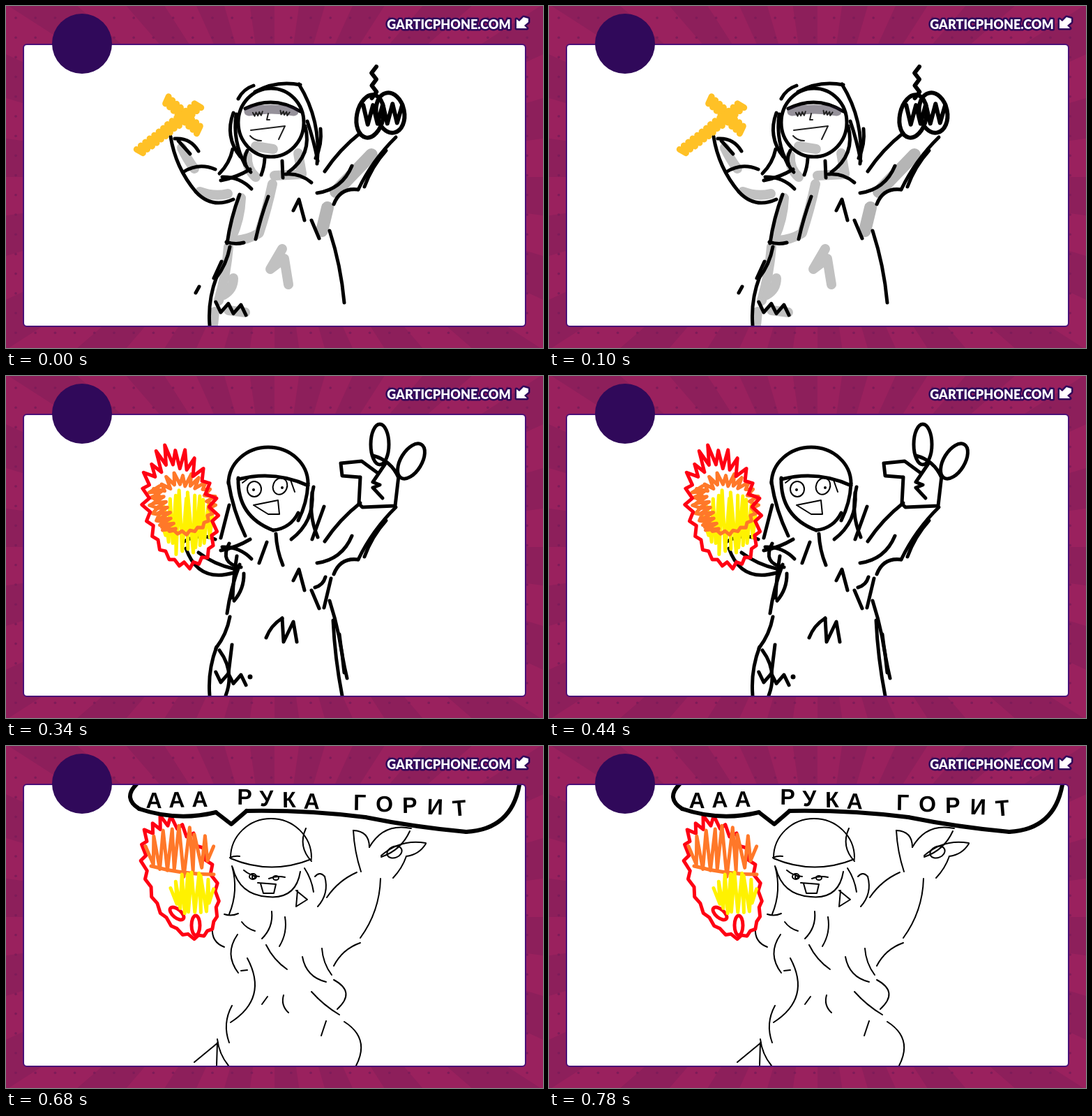
Animation, 770 px wide and 490 px high, one loop 0.85 s. Source, as an HTML page with a canvas:

```html
<!DOCTYPE html>
<html lang="en">
<head>
<meta charset="utf-8">
<title>Hand-drawn loop</title>
<style>
html, body { margin: 0; width: 100%; height: 100%; overflow: hidden; background: #98215d; }
canvas { display: block; }
</style>
</head>
<body>
<canvas id="stage" width="770" height="490"></canvas>
<script>
const ctx = document.getElementById('stage').getContext('2d');
const STEP = 170, TAU = 2 * Math.PI;
const RED = '#ff0013', ORANGE = '#ff7829', YELLOW = '#fff200', GOLD = '#ffc126';

const random = seed => { const v = Math.sin(seed * 12.9898) * 43758.5453; return v - Math.floor(v); };

function pen(color, width) {
  ctx.strokeStyle = ctx.fillStyle = color;
  ctx.lineWidth = width;
  ctx.lineCap = ctx.lineJoin = 'round';
}

// Stroke between two points, bulging by sag (right-going strokes sag downwards).
function bow(x1, y1, x2, y2, sag = 0) {
  const k = 2 * sag / Math.hypot(x2 - x1, y2 - y1);
  ctx.beginPath();
  ctx.moveTo(x1, y1);
  ctx.quadraticCurveTo((x1 + x2) / 2 + (y1 - y2) * k, (y1 + y2) / 2 + (x2 - x1) * k, x2, y2);
  ctx.stroke();
}

function polyline(...p) {
  ctx.beginPath();
  for (let i = 0; i < p.length; i += 2) ctx.lineTo(p[i], p[i + 1]);
  ctx.stroke();
}

function oval(x, y, rx, ry = rx, tilt = 0, from = 0, to = TAU) {
  ctx.beginPath();
  ctx.ellipse(x, y, rx, ry, tilt, from, to);
  ctx.stroke();
}

// Zigzag along a line, swinging by reach to either side.
function scribble(x1, y1, x2, y2, turns, reach) {
  const len = Math.hypot(x2 - x1, y2 - y1);
  ctx.beginPath();
  for (let i = 0; i <= turns; i++) {
    const k = i / turns, r = (i % 2 ? 1 : -1) * reach * (0.75 + 0.25 * random(i)) / len;
    ctx.lineTo(x1 + (x2 - x1) * k + (y1 - y2) * r, y1 + (y2 - y1) * k + (x2 - x1) * r);
  }
  ctx.stroke();
}

// Up and down strokes that fill an oval from left to right.
function hatch(color, x, y, rx, ry, turns) {
  pen(color, 5);
  ctx.beginPath();
  for (let i = 0; i <= turns; i++) {
    const u = 2 * i / turns - 1;
    const h = ry * Math.sqrt(1.05 - u * u) * (0.7 + 0.3 * random(i + x));
    ctx.lineTo(x + rx * u + 6 * random(i), y + (i % 2 ? h : -h));
  }
  ctx.stroke();
}

// Closed oval with teeth that are deepest at its top.
function flame(color, x, y, rx, ry, tilt, depth, turns) {
  pen(color, 5);
  ctx.save();
  ctx.translate(x, y);
  ctx.rotate(tilt);
  ctx.beginPath();
  for (let i = 0; i < turns; i++) {
    const a = i / turns * TAU, top = (1 - Math.sin(a)) / 2;
    const k = 1 - depth * (0.25 + 0.75 * top) * (i % 2 ? 0.6 + 0.4 * random(i) : 0.3 * random(i));
    ctx.lineTo(rx * k * Math.cos(a), ry * k * Math.sin(a));
  }
  ctx.closePath();
  ctx.stroke();
  ctx.restore();
}

// Letters set one by one with a slightly unsteady hand.
function scrawl(text, x, y, dx, dy, font) {
  ctx.font = font;
  ctx.textAlign = 'center';
  [...text].forEach((letter, i) => {
    ctx.save();
    ctx.translate(x + i * dx, y + i * dy);
    ctx.rotate(0.25 * (random(i + 3) - 0.5));
    ctx.fillText(letter, 0, 0);
    ctx.restore();
  });
}

function backdrop() {
  ctx.fillStyle = '#9a215e';
  ctx.fillRect(0, 0, 770, 490);
  ctx.fillStyle = '#8d1f5b';
  const rays = 22;
  for (let i = 0; i < rays; i++) {
    ctx.beginPath();
    ctx.moveTo(385, 245);
    ctx.arc(385, 245, 600, i / rays * TAU, (i + 0.5) / rays * TAU);
    ctx.fill();
  }
  ctx.fillStyle = '#7d1c59';
  for (let y = 17; y < 490; y += 28.2)
    for (let x = 14; x < 770; x += 28.2) {
      ctx.beginPath();
      ctx.arc(x, y, 1.8, 0, TAU);
      ctx.fill();
    }
  ctx.beginPath();
  ctx.roundRect(25, 55, 720, 404, 5);
  pen('#4a1077', 2);
  ctx.fillStyle = '#fff';
  ctx.fill();
  ctx.stroke();
}

function header() {
  pen('#30095a', 5);
  ctx.beginPath();
  ctx.arc(109, 54, 43, 0, TAU);
  ctx.fill();
  ctx.font = '900 18px Lato, sans-serif';
  ctx.textAlign = 'center';
  ctx.strokeText('GARTICPHONE.COM', 635, 33);
  const arrow = new Path2D('M732 19 L736 22 L742 16 L749 18 L749 23 L743 28 L747 32 L732 32 Z');
  ctx.stroke(arrow);
  ctx.fillStyle = '#fff';
  ctx.fillText('GARTICPHONE.COM', 635, 33);
  ctx.fill(arrow);
}

// Robe and arms of the three bold drawings.
function robe() {
  bow(335, 270, 317, 340, 2);
  bow(321, 345, 301, 390, -3);
  bow(302, 388, 292, 458, 4);
  bow(464, 322, 485, 425, -3);
  bow(254, 238, 300, 234, -6);
  bow(310, 245, 352, 262, -5);
  bow(350, 234, 308, 250, -2);
  bow(508, 182, 457, 237, 3);
  bow(446, 268, 496, 229, 9);
  bow(559, 188, 505, 263, 4);
  bow(505, 263, 470, 284, 8);
  bow(545, 207, 514, 259, 3);
  polyline(412, 293, 420, 277, 428, 307);
  bow(438, 307, 449, 333);
  scribble(300, 430, 345, 436, 5, 8);
}

function leftForearm() {
  bow(236, 187, 272, 266, 6);
  bow(272, 266, 326, 277, 10);
  bow(242, 190, 276, 208, -6);
  bow(247, 193, 264, 212);
  bow(376, 273, 358, 334, 1);
  bow(316, 338, 341, 339, 2);
}

function hoodSides(width) {
  pen('#000', width);
  bow(355, 114, 333, 133, 3);
  bow(330, 155, 343, 228, 6);
  bow(432, 165, 447, 222, -1);
  bow(429, 172, 405, 238, -12);
}

function shadedPose() {
  pen('#c1c1c1', 14);
  bow(252, 203, 270, 233, 1);
  bow(278, 266, 318, 269, 3);
  bow(337, 275, 323, 333, -3);
  bow(382, 255, 363, 325, -1);
  bow(362, 326, 329, 336, -2);
  bow(346, 215, 358, 245, 4);
  bow(419, 211, 424, 240);
  bow(424, 241, 385, 243);
  bow(319, 345, 305, 422, -2);
  bow(326, 390, 312, 414, -4);
  bow(299, 438, 297, 458);
  bow(319, 436, 343, 439);
  polyline(396, 348, 379, 377, 399, 362, 405, 399);
  bow(358, 201, 383, 205);
  pen('#b5b5b5', 18);
  bow(524, 213, 473, 266);
  bow(461, 289, 453, 322);

  pen('#000', 5);
  oval(380, 167, 47, 49);
  bow(343, 147, 422, 151, -11);
  bow(357, 123, 422, 113, -6);
  bow(420, 112, 446, 226, -10);
  bow(451, 176, 444, 218, -3);
  bow(326, 153, 336, 216, 9);
  bow(325, 205, 306, 240, -3);
  bow(346, 207, 351, 238, 6);
  bow(371, 218, 366, 242, -1);
  bow(396, 222, 397, 246);
  bow(401, 241, 438, 253, -4);
  bow(309, 366, 298, 390);
  bow(277, 402, 272, 411);
  hoodSides(5);
  robe();
  leftForearm();

  pen('#000', 6);
  scribble(528, 87, 528, 132, 5, 4);
  oval(522, 158, 19, 31, 0.2);
  oval(551, 153, 20, 29, -0.2);
  scribble(512, 154, 568, 155, 8, 16);

  pen('rgba(35,25,45,.48)', 13);
  bow(348, 151, 413, 151, -3);
  pen('#222', 2);
  scribble(354, 155, 368, 154, 6, 3);
  scribble(393, 152, 406, 155, 6, 3);
  polyline(376, 154, 374, 163, 378, 163);
  polyline(351, 178, 400, 172, 391, 191);
  bow(350, 186, 366, 193, 2);

  pen(GOLD, 9);
  scribble(230, 133, 277, 179, 17, 6);
  scribble(277, 142, 190, 209, 27, 6);
}

function torchPose() {
  pen('#666', 6);
  bow(405, 106, 447, 221, -13);
  bow(327, 196, 304, 247, -4);
  bow(275, 200, 286, 222);
  bow(455, 187, 453, 222);
  bow(453, 222, 436, 234);
  bow(371, 227, 370, 263);
  bow(391, 226, 398, 257);
  bow(345, 279, 327, 338);
  bow(543, 227, 514, 260);
  bow(277, 402, 272, 408);
  bow(369, 380, 398, 343, 5);
  scribble(392, 364, 410, 378, 5, 15);
  scribble(321, 382, 308, 428, 6, 6);
  scribble(464, 288, 453, 318, 7, 6);
  ctx.beginPath();
  ctx.ellipse(380, 149, 43, 11, 0, 0, TAU);
  ctx.fill();

  hoodSides(5);
  oval(381, 176, 47, 40);
  oval(376, 158, 47, 45, 0, Math.PI, TAU - 0.45);
  robe();
  leftForearm();
  bow(310, 245, 320, 269, 10);
  bow(267, 244, 311, 266, 5);

  oval(537, 157, 32, 33);
  bow(514, 132, 526, 184, -16);
  bow(554, 130, 548, 180, 5);
  pen('#000', 6);
  oval(535, 98, 10, 29, 0.1);
  oval(492, 135, 15, 10, 0.1);
  oval(590, 120, 13, 27, 0.45);
  bow(578, 121, 603, 97, -3);

  pen('#000', 2);
  scribble(355, 151, 368, 153, 3, 3);
  scribble(383, 150, 399, 150, 3, 3);
  bow(373, 157, 381, 158, 7);
  polyline(350, 176, 398, 173, 389, 196);
  bow(354, 187, 362, 197);

  pen(GOLD, 9);
  scribble(230, 149, 222, 256, 27, 8);
  scribble(177, 176, 287, 179, 27, 10);

  flame(RED, 183, 152, 20, 36, 0, 0.5, 12);
  pen(ORANGE, 5);
  scribble(191, 130, 190, 173, 6, 8);
  pen(YELLOW, 5);
  scribble(181, 126, 181, 172, 6, 8);
}

function blazePose() {
  pen('#000', 5);
  oval(376, 154, 57, 52, 0, Math.PI, TAU);
  bow(319, 152, 343, 229, 3);
  bow(433, 154, 419, 207, -3);
  bow(333, 148, 433, 157, -9);
  bow(333, 146, 383, 221, 16);
  bow(383, 221, 419, 196, 6);
  bow(320, 185, 308, 232);
  bow(441, 159, 447, 231, 6);
  bow(439, 167, 409, 234, -10);
  bow(456, 187, 439, 234);
  bow(320, 240, 337, 274, 13);
  bow(374, 238, 363, 268);
  bow(387, 226, 397, 271, 2);
  bow(276, 253, 326, 276, 3);
  bow(258, 247, 326, 282, 18);
  bow(331, 258, 325, 318, 1);
  bow(341, 283, 327, 322, -4);
  bow(324, 385, 319, 426);
  bow(306, 393, 315, 458, -9);
  bow(443, 303, 458, 288, 3);
  bow(466, 290, 456, 332);
  bow(373, 375, 396, 347, -3);
  polyline(396, 347, 398, 381, 412, 352, 417, 381);
  bow(469, 350, 482, 458, 2);
  bow(478, 370, 489, 433, 1);
  robe();
  oval(350, 431, 1);

  polyline(508, 145, 506, 183, 511, 188, 558, 186, 563, 143);
  oval(536, 98, 13, 29);
  oval(581, 122, 15, 28, 0.55);
  polyline(507, 145, 482, 143, 480, 125, 510, 122, 533, 139);
  bow(526, 114, 563, 146, -6);
  polyline(545, 124, 526, 152, 536, 156, 526, 160, 540, 175);

  pen('#000', 2);
  oval(356, 162, 10, 11);
  oval(393, 158, 10, 12, 0.4);
  oval(355, 163, 1);
  oval(396, 160, 1);
  bow(408, 149, 414, 166);
  bow(339, 153, 347, 147);
  polyline(355, 185, 390, 178, 392, 198, 376, 198, 355, 185);

  hatch(YELLOW, 256, 210, 36, 48, 22);
  flame(ORANGE, 253, 182, 48, 46, -0.2, 0.5, 46);
  pen(ORANGE, 5);
  scribble(213, 160, 234, 222, 16, 10);
  flame(RED, 249, 186, 54, 92, -0.2, 0.42, 46);
}

// Head, hand and body shared by the two thin drawings.
function thinFigure() {
  pen('#000', 2);
  oval(380, 160, 58, 56, 0, Math.PI, TAU);
  bow(322, 161, 438, 162, 12);
  bow(325, 174, 375, 216, 12);
  bow(375, 216, 422, 180, 14);
  bow(324, 172, 320, 241, -6);
  bow(313, 241, 333, 240, 2);
  bow(428, 175, 441, 209, -2);
  bow(443, 187, 457, 187, -4);
  bow(457, 187, 447, 230, -6);

  bow(498, 121, 509, 180, 2);
  bow(498, 121, 521, 145, -8);
  bow(521, 145, 581, 118, -12);
  bow(579, 122, 538, 159, -6);
  bow(538, 157, 602, 139, -8);
  bow(602, 140, 574, 158, -4);
  bow(574, 158, 555, 189, -2);
  oval(557, 152, 11, 8, -0.4);
  bow(503, 181, 460, 217, 4);
  bow(537, 190, 508, 275, -7);

  bow(332, 270, 333, 325, 10);
  bow(346, 304, 322, 396, -22);
  bow(381, 237, 367, 276, -5);
  bow(373, 285, 403, 320, 3);
  bow(425, 302, 459, 338, 8);
  bow(453, 290, 467, 328, 3);
  bow(470, 335, 475, 377, -15);
  bow(438, 352, 478, 385, 2);
  bow(324, 372, 320, 425, 6);
  bow(303, 420, 319, 458, 3);
}

function note(x, y) {
  bow(x, y, x - 2, y + 34);
  bow(x, y, x + 8, y + 14, -4);
  oval(x - 5, y + 34, 4, 5, 0.6);
}

function singingPose() {
  thinFigure();
  bow(307, 87, 304, 123, 8);
  bow(338, 74, 313, 118, 9);
  bow(440, 102, 442, 130, -3);
  bow(453, 95, 453, 137, -2);
  bow(312, 205, 315, 243, -12);
  bow(330, 242, 379, 265, 9);
  bow(379, 265, 376, 231, 4);
  bow(390, 238, 394, 281, -12);
  bow(289, 262, 313, 263, 3);
  bow(287, 264, 330, 283, 14);
  bow(322, 372, 330, 441, 17);
  bow(329, 372, 324, 397);
  bow(470, 335, 470, 395, -18);
  bow(465, 380, 448, 423, -6);
  bow(470, 395, 486, 455, -16);
  bow(362, 379, 378, 372, -12);
  bow(378, 374, 395, 374, -13);
  bow(395, 374, 421, 359, 11);
  bow(457, 217, 458, 240);
  bow(509, 180, 556, 192, 8);
  bow(508, 254, 502, 300, 2);
  bow(502, 300, 470, 320, 2);
  bow(282, 455, 306, 426, -6);
  bow(306, 402, 313, 423, 8);
  bow(286, 452, 311, 440, -5);

  pen('#000', 4);
  bow(345, 190, 363, 192, 1);
  bow(388, 190, 402, 188, 1);
  bow(371, 206, 387, 206, 3);
  pen('#000', 3);
  note(135, 244);
  note(612, 224);
  oval(122, 107, 5, 2, -0.6);
  polyline(643, 106, 647, 80, 663, 81, 660, 102);
  bow(647, 86, 663, 88);
  oval(640, 107, 4, 3);
  oval(657, 103, 4, 3);

  pen('#000', 2);
  scrawl('ееее', 66, 366, 18, -8, 'italic 300 34px Inter, sans-serif');
  scrawl('РОК!', 126, 409, 26, -10, '300 36px Inter, sans-serif');

  for (const size of [1, 0.9, 0.82])
    flame(RED, 250, 178, 54 * size, 88 * size, -0.3, 0.25, 44);
  pen(RED, 5);
  oval(276, 267, 10, 11, 0, 0.8, 5);
  bow(295, 224, 316, 224);
  flame(ORANGE, 258, 164, 42, 46, -0.3, 0.55, 30);
  hatch(YELLOW, 266, 203, 24, 34, 16);
}

function shoutingPose() {
  thinFigure();
  bow(321, 160, 335, 158, -1);
  bow(438, 165, 430, 118, -8);
  polyline(416, 207, 432, 220, 416, 230, 418, 207);
  bow(508, 282, 470, 315, 5);
  bow(296, 261, 313, 288, 6);
  bow(338, 252, 357, 265, 2);
  bow(400, 245, 392, 287, -4);
  bow(337, 322, 346, 321);
  bow(375, 359, 367, 370);
  bow(398, 357, 405, 382, 4);
  bow(459, 394, 452, 415);
  bow(485, 395, 502, 458, -15);
  bow(270, 453, 304, 425);
  bow(303, 425, 302, 458);
  bow(341, 178, 363, 187, 2);
  oval(354, 187, 5, 4);
  oval(355, 188, 2);
  bow(377, 190, 400, 188, -2);
  oval(387, 189, 4, 3);
  polyline(361, 196, 387, 198, 384, 211, 369, 211, 365, 197);

  flame(RED, 249, 187, 50, 94, -0.35, 0.25, 42);
  pen(RED, 5);
  oval(245, 240, 12, 6, 0.7);
  oval(272, 257, 6, 14);
  hatch(ORANGE, 246, 151, 46, 36, 16);
  bow(208, 172, 298, 184, 3);
  hatch(YELLOW, 264, 211, 28, 34, 16);

  pen('#000', 6);
  bow(187, 55, 191, 90, 11);
  bow(191, 90, 301, 95, 8);
  polyline(301, 95, 323, 112, 345, 93);
  bow(345, 93, 515, 102, -3);
  bow(515, 102, 660, 123, 2);
  bow(660, 123, 736, 56, 20);
  const bold = 'bold 32px "Liberation Sans", Arial, sans-serif';
  scrawl('ААА', 212, 89, 33, -1, bold);
  scrawl('РУКА', 342, 84, 32, 2, bold);
  scrawl('ГОРИТ', 507, 92, 36, 2, bold);
}

const poses = [shadedPose, torchPose, blazePose, singingPose, shoutingPose];
let shown = -1;

function render(now) {
  const index = Math.floor(now / STEP) % poses.length;
  if (index !== shown) {
    shown = index;
    backdrop();
    ctx.save();
    ctx.beginPath();
    ctx.roundRect(26, 56, 718, 402, 4);
    ctx.clip();
    poses[index]();
    ctx.restore();
    header();
  }
  requestAnimationFrame(render);
}
render(0);
</script>
</body>
</html>
```
